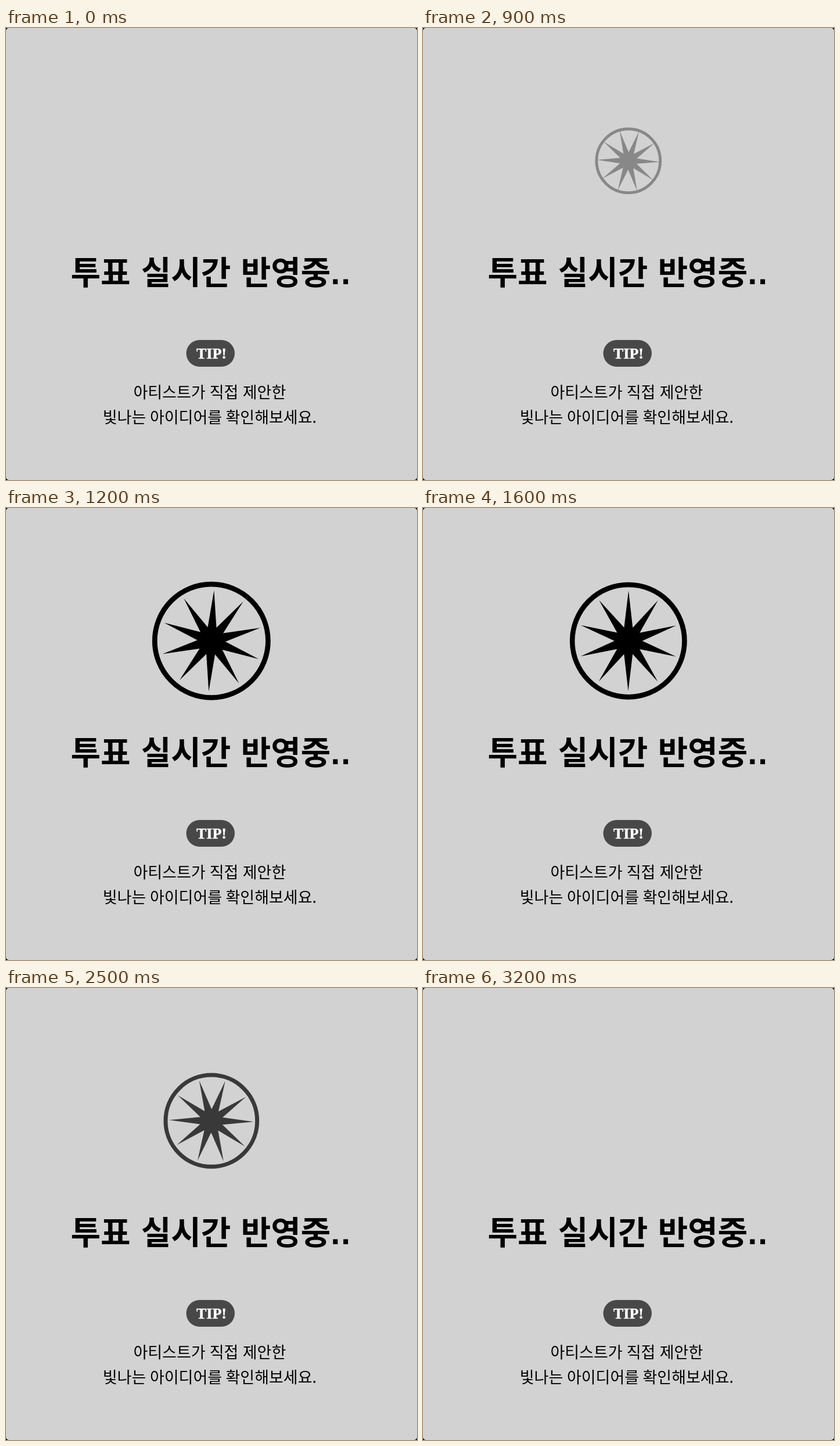
Write an HTML page that moves like this. It is 708 px wide and 778 px high and loops after 3.6 s.

```html
<!DOCTYPE html>
<html lang="ko">
<head>
<meta charset="utf-8">
<title>투표 실시간 반영중</title>
<style>
  html, body { margin: 0; width: 100%; height: 100%; overflow: hidden; background: #000; }
  svg { display: block; width: 708px; height: 778px; }
  text { font-family: "Noto Sans CJK KR", "Noto Sans CJK", sans-serif; text-anchor: middle; }
  .title { font-size: 56px; font-weight: 700; }
  .title .dots { font: 700 57px "Liberation Sans", sans-serif; letter-spacing: 1.8px; text-anchor: start; }
  .tip { font: 700 26px "Liberation Serif", serif; fill: #fff; stroke: #fff; stroke-width: 0.5px; }
  .note { font-size: 27px; }
  .start { text-anchor: start; }
</style>
</head>
<body>
<svg viewBox="0 0 708 778">
  <rect width="708" height="778" rx="5" fill="#d2d2d2"/>
  <g id="icon" transform="translate(353.8 228.7)">
    <circle id="ring" r="96.6" fill="none" stroke="#000" stroke-width="8.6"/>
    <path id="star"/>
  </g>
  <g class="title">
    <text x="163" y="441">투표</text>
    <text x="310" y="441">실시간</text>
    <text x="482" y="441">반영중</text>
    <text class="dots" x="559.5" y="440.5">..</text>
  </g>
  <rect x="310.5" y="537" width="83.5" height="46" rx="23" fill="#484848"/>
  <text class="tip" x="354" y="569">TIP!</text>
  <g class="note">
    <text x="281.5" y="637">아티스트가</text>
    <text x="375.5" y="637">직접</text>
    <text x="445" y="637">제안한</text>
    <text x="204" y="680">빛나는</text>
    <text x="310" y="680">아이디어를</text>
    <text class="start" x="378.5" y="680">확인해보세요.</text>
  </g>
</svg>
<script>
  const LOOP = 3600, STEP = 100;
  const ENTER = 800, LEAVE = 2400, GONE = 2600;
  const TURN = 177;
  const [icon, ring, star] = ['icon', 'ring', 'star'].map(id => document.getElementById(id));

  function starPath(points, outer, inner) {
    const corners = Array.from({ length: points * 2 }, (_, i) => {
      const r = i % 2 ? inner : outer;
      const a = i * Math.PI / points;
      return `${(r * Math.sin(a)).toFixed(2)} ${(-r * Math.cos(a)).toFixed(2)}`;
    });
    return `M${corners.join('L')}Z`;
  }

  // Damped spring from 0 to 1: stiffness 100, damping 15, mass 1.
  function spring(ms) {
    if (ms <= 0) return 0;
    const t = ms / 1000, decay = 7.5, freq = Math.sqrt(100 - decay * decay);
    return 1 - Math.exp(-decay * t) *
      (Math.cos(freq * t) + decay / freq * Math.sin(freq * t));
  }

  const mix = (from, p) => from + (1 - from) * p;

  function draw(time) {
    const t = Math.floor(time % LOOP / STEP) * STEP;
    const visible = t > ENTER && t < GONE;
    icon.style.display = visible ? '' : 'none';
    if (visible) {
      const p = t < LEAVE ? spring(t - ENTER) : 1 - spring(t - LEAVE);
      const alpha = Math.min(1, mix(0.08, p));
      ring.setAttribute('transform', `scale(${mix(0.385, p)})`);
      star.setAttribute('transform', `rotate(${-TURN * (1 - p)}) scale(${mix(0.47, p)})`);
      ring.setAttribute('opacity', alpha);
      star.setAttribute('opacity', alpha);
    }
  }

  function tick() {
    draw(performance.now());
    requestAnimationFrame(tick);
  }

  star.setAttribute('d', starPath(10, 86.3, 24));
  tick();
</script>
</body>
</html>
```
